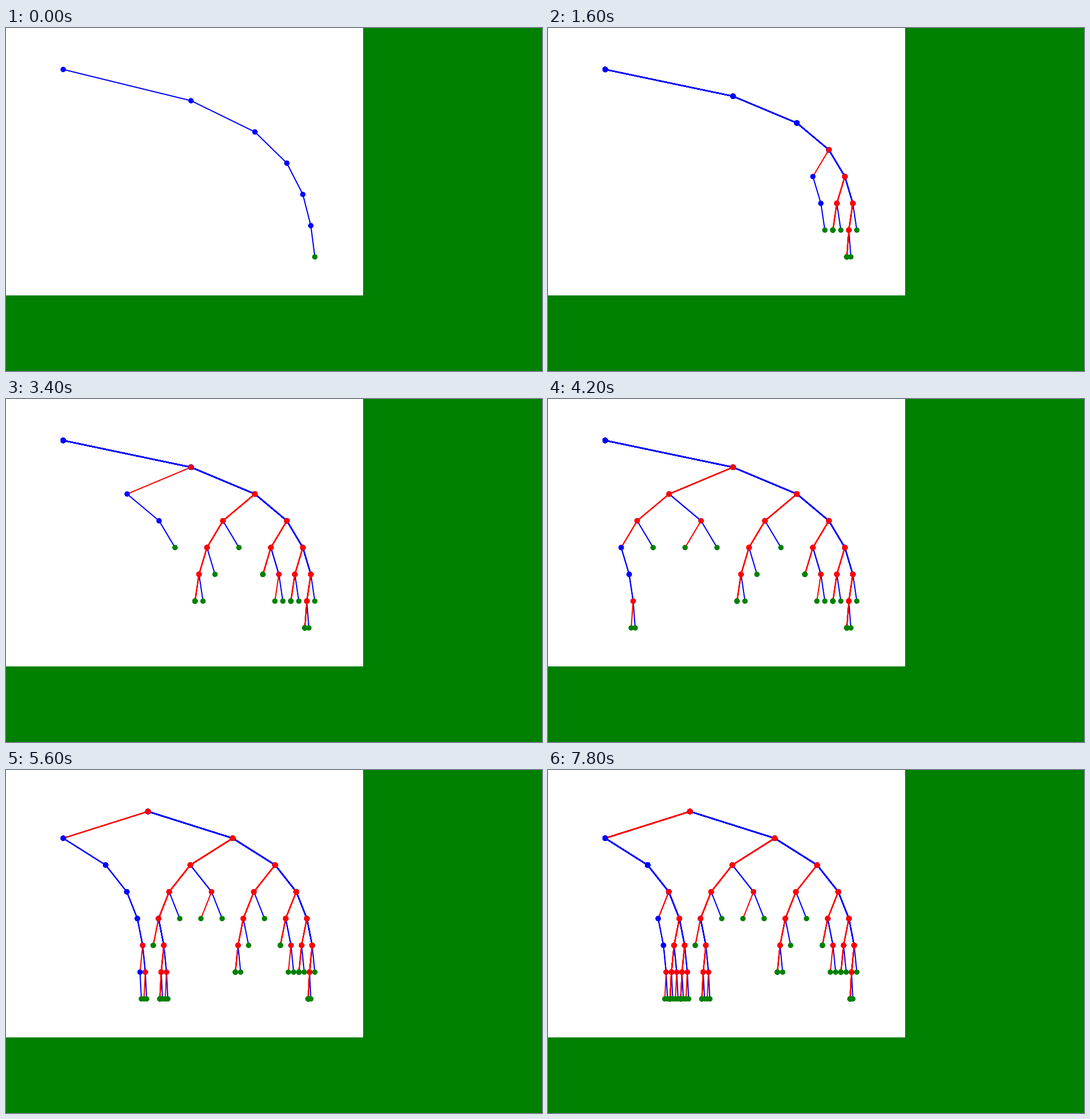
Animation of 935 by 599 pixels, one loop 8000 ms. Source, as a matplotlib script:

```python
import matplotlib.pyplot as plt
from matplotlib.animation import FuncAnimation
from matplotlib.collections import LineCollection
from matplotlib.patches import Rectangle

W, H, DPI = 935, 599, 100
PANEL_W, PANEL_H = 623, 467.4
LEFT, RIGHT, TOP, BOTTOM = 99.8, 538.7, 72.4, 399.7
BLUE, RED, GREEN = (0, 0, 1), (1, 0, 0), (0, 128 / 255, 0)

# Branches taken from the root to each leaf, in search order.
LEAVES = """
RRRRRR RRRRRLR RRRRRLL RRRRLR RRRRLL RRRLRR RRRLRL RRRLL RRLR RRLLR
RRLLLR RRLLLL RLRR RLRL RLLR RLLLRRR RLLLRRL RLLLRLR RLLLRLL RLLLL
LRRRRRR LRRRRRL LRRRRLR LRRRRLL LRRRLRR LRRRLRL LRRRLLR LRRRLLL
LRRLRRR LRRLRRL
""".split()

# Frames a leaf stays the newest one; all others take one.
HOLD = {"RRRRRLL": 3, "RRRRLL": 2, "RRRLL": 2, "RRLLLL": 2,
        "RLLLRLL": 2, "LRRRRLL": 2, "LRRRLLL": 4}
VISITS = [leaf for leaf in LEAVES for _ in range(HOLD.get(leaf, 1))]


def walk(path):
    """Unscaled x at every depth: each step is half as wide as the last."""
    xs = [0.0]
    for depth, turn in enumerate(path):
        step = 0.5 ** depth
        xs.append(xs[-1] + (step if turn == "R" else -step))
    return xs


fig = plt.figure(figsize=(W / DPI, H / DPI), dpi=DPI, facecolor=GREEN)
ax = fig.add_axes([0, 0, 1, 1])
ax.set_xlim(0, W)
ax.set_ylim(H, 0)
ax.axis("off")
ax.add_patch(Rectangle((0, 0), PANEL_W, PANEL_H, fc="white", lw=0, zorder=0))

edges = LineCollection([], linewidths=1.46, zorder=1)
ax.add_collection(edges, autolim=False)
dots = ax.scatter([], [], s=6.8 ** 2, linewidths=0, zorder=2)


def draw(frame):
    paths = []
    for leaf in VISITS[:frame + 1]:
        # A fully explored branch is traced again while backing out of it.
        paths += [leaf] * (2 if leaf.endswith("LL") else 1)

    walks = [walk(p) for p in paths]
    lo = min(min(xs) for xs in walks)
    hi = max(max(xs) for xs in walks)
    x_scale = (RIGHT - LEFT) / (hi - lo)
    row = (BOTTOM - TOP) / max(len(p) for p in paths)

    segments, edge_colors, points, dot_colors = [], [], [], []
    for path, xs in zip(paths, walks):
        nodes = [(LEFT + (x - lo) * x_scale, TOP + d * row)
                 for d, x in enumerate(xs)]
        colors = [BLUE if turn == "R" else RED for turn in path]
        segments += zip(nodes, nodes[1:])
        edge_colors += colors
        points += nodes
        dot_colors += colors + [GREEN]

    edges.set_segments(segments)
    edges.set_color(edge_colors)
    dots.set_offsets(points)
    dots.set_facecolor(dot_colors)
    return edges, dots


anim = FuncAnimation(fig, draw, frames=len(VISITS), interval=200,
                     repeat=True, repeat_delay=0)
plt.show()
```
